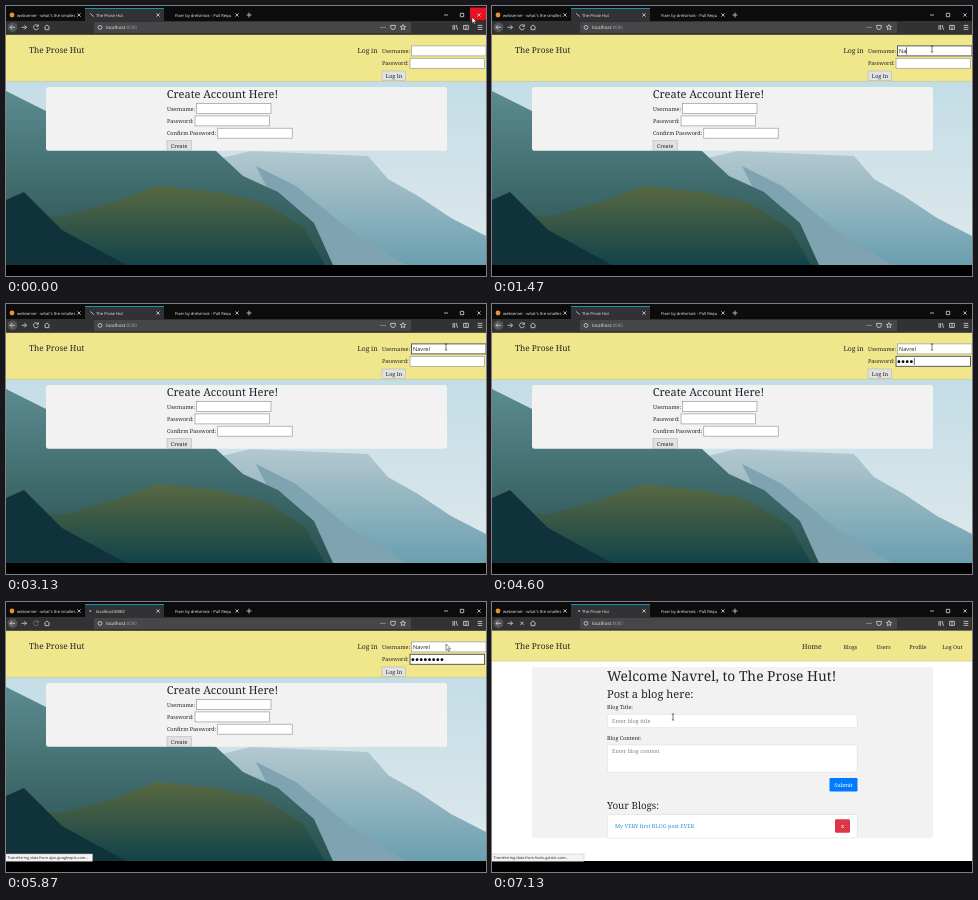
These frames come from a looping animation (480 by 270 pixels, 7190 ms). An HTML page:

```html
<!DOCTYPE html>
<html lang="en">
<head>
<meta charset="utf-8">
<title>Login demo</title>
<style>
html, body { margin: 0; width: 100%; height: 100%; overflow: hidden; background: #000; }
svg { display: block; width: 100%; height: 100%; }
text { text-rendering: geometricPrecision; white-space: pre; }
.serif { font-family: "Noto Serif", serif; fill: #212529; }
.sans { font-family: "Open Sans", "Noto Sans", sans-serif; fill: #eee; }
.icon { fill: none; stroke: #d8d8da; stroke-width: .8; }
.field { fill: #fff; stroke: #9a9a9c; stroke-width: .7; }
.field.focus { stroke: #4a4a4c; stroke-width: .9; }
.button { fill: #e1e1e1; stroke: #adadad; stroke-width: .5; }
.box { fill: #fff; stroke: #ced4da; stroke-width: .5; }
.hint { fill: #7d858c; }
.link { fill: #2196c9; }
.white { fill: #fff; text-anchor: middle; }
.dark { fill: #222; }
</style>
</head>
<body>
<svg id="stage" viewBox="0 0 480 270" preserveAspectRatio="none"></svg>
<script>
const LOOP = 7190, SITE = 'The Prose Hut', USER = 'Navrel';
const CLICK = 660, TAB = 3400, SUBMIT = 5530, LOADED = 6000;
const NAME_KEYS = { first: 1270, gap: 166, count: USER.length };
const PASS_KEYS = { first: 3670, gap: 240, count: 8 };
const BODY = 5.45, DOT_PITCH = 4.15;

const range = n => [...Array(n).keys()];
const rect = (x, y, w, h, attrs) => `<rect x="${x}" y="${y}" width="${w}" height="${h}" ${attrs}/>`;
const fill = (x, y, w, h, color, more = '') => rect(x, y, w, h, `fill="${color}" ${more}`);
const shape = (color, points) => `<polygon fill="${color}" points="${points}"/>`;
const text = (kind, x, y, size, str, id = '') =>
  `<text class="${kind}" x="${x}" y="${y}" font-size="${size}" id="${id}">${str}</text>`;
const serif = (x, y, size, str, kind = '') => text('serif ' + kind, x, y, size, str);
const sans = (x, y, size, str, id, kind = '') => text('sans ' + kind, x, y, size, str, id);
const icon = (x, y, d, id = '') => `<path class="icon" id="${id}" transform="translate(${x} ${y})" d="${d}"/>`;
const button = (x, y, w, str) => rect(x, y - 6.9, w, 9.7, 'class="button"') + serif(x + 3.8, y, BODY, str);
const formRow = (x, y, str, id = '') =>
  serif(x, y, BODY, str, 'row') + rect(x, y - 7, 74.5, 10, `class="field" id="${id}"`);
const gradient = (id, top, bottom) =>
  `<linearGradient id="${id}" x2="0" y2="1"><stop stop-color="${top}"/><stop offset="1" stop-color="${bottom}"/></linearGradient>`;

const CROSS = 'M-1.6 -1.6l3.2 3.2m0 -3.2l-3.2 3.2';
const STAR = 'M' + range(10).map(i => {
  const r = i % 2 ? 1.3 : 2.8, a = i * Math.PI / 5;
  return `${r * Math.sin(a)} ${-r * Math.cos(a)}`;
}).join('L') + 'z';

const browser = `
  ${fill(0, 0, 480, 15, '#0c0c0d')}${fill(0, 15, 480, 13.5, '#323234')}
  ${fill(79, 2, 79, 13, '#323234')}${fill(79, 2, 79, 1, '#1097b5')}
  <circle cx="6" cy="9" r="2.4" fill="#e8912d"/>
  ${sans(11, 10.6, 4.1, "webserver - what's the smalles")}
  ${sans(90, 10.6, 4.1, '', 'tabTitle')}
  ${sans(169, 10.6, 4.1, 'Fixer by drelvimok - Pull Requ')}
  ${range(3).map(i => icon(73 + 79 * i, 9, CROSS)).join('')}
  ${icon(243, 9, 'M-2.5 0h5m-2.5 -2.5v5')}
  ${icon(86, 9, 'M-1.8 -1.6l3.6 3.2', 'favicon')}
  <circle id="spinner" cy="9" r="1" fill="#65b5f5"/>
  ${fill(464, 1.5, 16, 13, '#e81123', 'id="closeHover"')}
  ${icon(440, 9, 'M-2 0h4')}${icon(456, 9, 'M-1.7 -1.7h3.4v3.4h-3.4z')}${icon(473, 9, CROSS)}
  <circle cx="6.5" cy="21.3" r="4.9" fill="#545456"/>
  ${icon(6.5, 21.3, 'M2.5 0h-5l2.2 -2.2m-2.2 2.2l2.2 2.2')}
  ${icon(18, 21.3, 'M-2.5 0h5l-2.2 -2.2m2.2 2.2l-2.2 2.2')}
  ${icon(30, 21.3, 'M2 -1.6a2.5 2.5 0 1 0 .4 2.4M2.4 -2.8v1.9h-1.9', 'reload')}
  ${icon(30, 21.3, CROSS, 'stop')}
  ${icon(41, 21.3, 'M-2.8 .2l2.8 -2.6l2.8 2.6M-1.9 0v2.4h3.8v-2.4')}
  ${fill(88, 16, 317, 11, '#474749', 'rx="1"')}
  <circle cx="94" cy="21.4" r="1.9" class="icon"/>
  ${sans(100, 23, 4.6, 'localhost<tspan fill="#98989c">:8080</tspan>')}
  ${icon(377, 21.4, 'M-2.5 0h1m1 0h1m1 0h1')}
  ${icon(387, 21.4, 'M-2.3 -2h4.6v1.8a2.3 2.3 0 0 1 -4.6 0z')}
  ${icon(397, 21.4, STAR)}
  ${icon(449, 21.4, 'M-2 -2.4v4.8m1.6 -4.8v4.8m1.6 -4.8l1.3 4.8')}
  ${icon(460, 21.4, 'M-2.4 -2h4.8v4h-4.8zM0 -2v4')}
  ${icon(474, 21.4, 'M-2.3 -2h4.6m-4.6 2h4.6m-4.6 2h4.6')}`;

const scenery = `
  ${fill(0, 75, 480, 184, 'url(#sky)')}
  ${shape('url(#rock)', '215,152 245,145 362,150 382,173 412,190 445,212 480,230 480,259 215,259')}
  ${shape('#7fa3b0', '250,160 290,180 345,225 400,259 300,259')}
  ${shape('url(#forest)', '0,85 40,105 210,145 237,170 272,186 308,217 327,259 0,259')}
  ${shape('url(#hill)', '0,206 56,211 109,196 151,180 209,186 256,196 298,222 319,259 0,259')}
  ${shape('#10323a', '0,194 18,186 56,224 120,259 0,259')}`;

const loginPage = `
  ${fill(0, 28.5, 480, 46.8, '#f0e68c')}${fill(0, 74.9, 480, .6, '#c9c48d')}
  ${serif(23, 47, 8.25, SITE)}${serif(351.5, 47, 6.8, 'Log in')}
  ${formRow(376, 46.9, 'Username:', 'userField')}
  ${formRow(376, 59.3, 'Password:', 'passField')}
  ${button(376, 71.9, 23.5, 'Log In')}
  ${sans(407, 47, 5.6, '', 'typed', 'dark')}
  <g id="dots">${range(PASS_KEYS.count).map(i => `<circle cx="${406.9 + DOT_PITCH * i}" cy="57.7" r="1.4"/>`).join('')}</g>
  ${fill(0, 0, .6, 7, '#111', 'id="caret"')}
  ${fill(40, 81, 401, 63.7, '#f2f2f2', 'rx="2.5"')}
  ${serif(160.7, 91.5, 11, 'Create Account Here!')}
  ${['Username:', 'Password:', 'Confirm Password:'].map((str, i) => formRow(161, 104.6 + 12.3 * i, str)).join('')}
  ${button(161, 141.6, 24.5, 'Create')}`;

const homePage = `
  ${fill(0, 28.5, 480, 230.5, '#fff')}
  ${fill(0, 28.5, 480, 30.5, '#f0e68c')}${fill(0, 58.8, 480, .6, '#cfcaa0')}
  ${serif(23, 47, 8.25, SITE)}${serif(310, 46.9, 6.95, 'Home')}
  ${['Blogs', 'Users', 'Profile', 'Log Out'].map((str, i) => serif(351.5 + 32.9 * i, 46.9, BODY, str)).join('')}
  ${fill(40, 65, 401, 171, '#f2f2f2', 'rx="2.5"')}
  ${serif(115, 79, 13.8, `Welcome ${USER}, to ${SITE}!`)}
  ${serif(115, 96, 11.05, 'Post a blog here:')}
  ${serif(115, 107.2, BODY, 'Blog Title:')}
  ${rect(115.3, 112.3, 250, 13.4, 'class="box" rx="1.3"')}
  ${serif(120, 121.1, BODY, 'Enter blog title', 'hint')}
  ${serif(115, 137.6, BODY, 'Blog Content:')}
  ${rect(115.3, 142.8, 250, 27.4, 'class="box" rx="1.3"')}
  ${serif(120, 151.4, BODY, 'Enter blog content', 'hint')}
  ${fill(337.5, 176, 28, 13.6, '#007bff', 'rx="1.3"')}
  ${serif(351.5, 184.8, BODY, 'Submit', 'white')}
  ${serif(115, 207.3, 9.8, 'Your Blogs:')}
  ${rect(115.3, 212.5, 250, 23.5, 'class="box" rx="1.3"')}
  ${serif(123, 226.2, BODY, 'My VERY first BLOG post EVER', 'link')}
  ${fill(343, 217.2, 15, 13.6, '#dc3545', 'rx="1.3"')}
  ${serif(350.5, 225.7, BODY, 'x', 'white')}`;

const stage = document.getElementById('stage');
stage.innerHTML = `
  <defs>
    ${gradient('sky', '#c3dde6', '#dfe9ec')}${gradient('rock', '#b4c8cf', '#6a9fb0')}
    ${gradient('forest', '#5b8b90', '#29504e')}${gradient('hill', '#586841', '#12434b')}
  </defs>
  ${fill(0, 0, 480, 270, '#000')}
  <g id="login">${scenery}${loginPage}</g>
  <g id="home">${homePage}</g>
  ${browser}
  <g id="status">
    ${rect(-1, 252, 0, 7.2, 'id="statusBox" fill="#f4f4f4" stroke="#bbb" stroke-width=".5"')}
    ${sans(1.5, 257.2, 3.85, '', 'statusText', 'dark')}
  </g>
  <path id="arrow" d="M0 -1v6.4l1.5 -1.3l1 2.2l1 -.5l-1 -2.1h2z" fill="#fff" stroke="#111" stroke-width=".5"/>
  <path id="beam" d="M-1.2 -3h2.4M0 -3v6M-1.2 3h2.4" stroke="#222" stroke-width=".6"/>`;

const el = Object.fromEntries([...stage.querySelectorAll('[id]')].map(node => [node.id, node]));
const show = (node, on) => node.setAttribute('visibility', on ? 'visible' : 'hidden');
const setText = (node, str) => { if (node.textContent !== str) node.textContent = str; };

// Each input follows its label
for (const label of stage.querySelectorAll('.row'))
  label.nextElementSibling.setAttribute('x', +label.getAttribute('x') + label.getComputedTextLength() + 1.5);

const clamp = (v, lo, hi) => Math.min(hi, Math.max(lo, v));
const keysPressed = ({ first, gap, count }, t) => clamp(Math.floor((t - first) / gap) + 1, 0, count);
const lastKey = (keys, pressed, otherwise) => pressed ? keys.first + keys.gap * (pressed - 1) : otherwise;

function glide(t, from, to, [x0, y0], [x1, y1]) {
  const k = clamp((t - from) / (to - from), 0, 1), e = k * k * (3 - 2 * k);
  return [x0 + (x1 - x0) * e, y0 + (y1 - y0) * e];
}
function pointer(t) {
  const close = [466, 12], input = [440, 43], entry = [226, 102], title = [181, 115];
  if (t < SUBMIT) return glide(t, 90, 600, close, input);
  if (t < 6130) return glide(t, 5890, 6130, input, entry);
  return glide(t, 6130, 7000, entry, title);
}

function draw(t) {
  const loaded = t >= LOADED, loading = t >= SUBMIT, onPassword = t >= TAB;
  el.login.style.display = loaded ? 'none' : '';
  el.home.style.display = loaded ? '' : 'none';

  const letters = keysPressed(NAME_KEYS, t), dots = keysPressed(PASS_KEYS, t);
  setText(el.typed, USER.slice(0, letters));
  [...el.dots.children].forEach((dot, i) => { dot.style.display = i < dots ? '' : 'none'; });
  el.userField.classList.toggle('focus', t >= CLICK && !onPassword);
  el.passField.classList.toggle('focus', onPassword);

  // The caret restarts its blink after each key
  const blinkStart = onPassword ? lastKey(PASS_KEYS, dots, TAB) : lastKey(NAME_KEYS, letters, CLICK);
  const caretOn = t >= CLICK && !loading && (t - blinkStart) % 1100 < 500;
  el.caret.style.display = caretOn ? '' : 'none';
  el.caret.setAttribute('x', onPassword ? 405.3 + DOT_PITCH * dots
    : 407 + (letters ? el.typed.getComputedTextLength() : 0));
  el.caret.setAttribute('y', onPassword ? 53.9 : 41.5);

  setText(el.tabTitle, loading && !loaded ? 'localhost:8080/' : SITE);
  show(el.favicon, !loading);
  show(el.spinner, loading);
  el.spinner.setAttribute('cx', 86 + 2 * Math.sin(t / 160));
  show(el.reload, !loaded);
  el.reload.setAttribute('opacity', loading ? .4 : 1);
  show(el.stop, loaded);
  show(el.status, loading);
  setText(el.statusText, `Transferring data from ${loaded ? 'fonts.gstatic.com' : 'ajax.googleapis.com'}...`);
  el.statusBox.setAttribute('width', loaded ? 93 : 87.5);

  const [x, y] = pointer(t);
  const overText = loaded ? y > 112 : y > 40 && !loading;
  show(el.arrow, !overText);
  show(el.beam, overText);
  for (const cursor of [el.arrow, el.beam]) cursor.setAttribute('transform', `translate(${x} ${y})`);
  show(el.closeHover, x > 464 && y < 15);
}

const start = performance.now();
function tick() {
  draw((performance.now() - start) % LOOP);
  requestAnimationFrame(tick);
}
tick();
</script>
</body>
</html>
```
